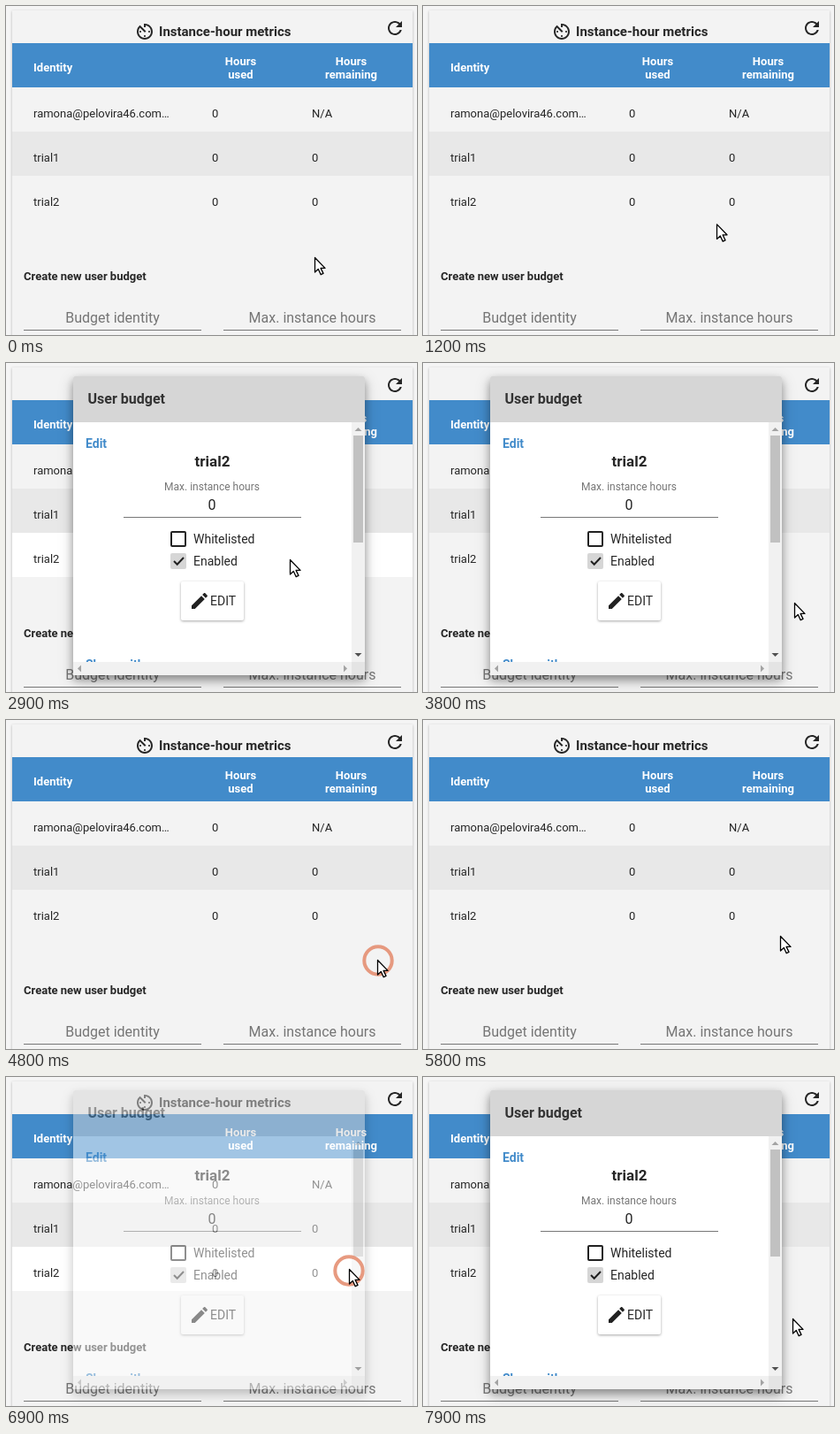
These frames come from a looping animation (465x372 px, 8000 ms). An HTML page:

```html
<!DOCTYPE html>
<html lang="en">
<head>
<meta charset="utf-8">
<title>Instance-hour metrics</title>
<style>
  html, body { margin: 0; width: 100%; height: 100%; overflow: hidden; background: #f5f5f5; }
  svg { display: block; width: 465px; height: 372px; }
  text { font: 13px Roboto, sans-serif; fill: #262626; }
  .b { font-weight: 700; }
  .mid { text-anchor: middle; }
  .head text { fill: #fff; font-weight: 700; }
  .s14 { font-size: 14px; }
  .s16 { font-size: 16px; }
  .hint { fill: #757575; }
  .link { font-size: 14px; font-weight: 700; fill: #428bca; }
  .rule { stroke: #777; stroke-width: 1; }
  #card { filter: drop-shadow(0 1px 1.5px rgba(0,0,0,.28)); }
  #panel { filter: drop-shadow(0 5px 5px rgba(0,0,0,.3)) drop-shadow(0 5px 8px rgba(0,0,0,.2)); }
  #button { filter: drop-shadow(0 1.5px 1.5px rgba(0,0,0,.35)); }
</style>
</head>
<body>
<svg viewBox="0 0 465 372" xmlns="http://www.w3.org/2000/svg">
  <defs><clipPath id="view"><rect x="76" y="67" width="315" height="271"/></clipPath></defs>

  <rect width="465" height="372" fill="#f5f5f5"/>
  <rect id="card" x="7" y="5" width="453" height="400" fill="#f3f3f3"/>
  <path transform="translate(145 17)" fill="#262626" d="M11 17c0 .55.45 1 1 1s1-.45 1-1-.45-1-1-1-1 .45-1 1zm0-14v4h2V5.08c3.39.49 6 3.39 6 6.92 0 3.87-3.13 7-7 7s-7-3.13-7-7c0-1.68.59-3.22 1.58-4.42L12 13l1.41-1.41-6.8-6.8v.02C4.42 6.45 3 9.05 3 12c0 4.97 4.02 9 9 9 4.97 0 9-4.03 9-9s-4.03-9-9-9h-1zm7 9c0-.55-.45-1-1-1s-1 .45-1 1 .45 1 1 1 1-.45 1-1zM6 12c0 .55.45 1 1 1s1-.45 1-1-.45-1-1-1-1 .45-1 1z"/>
  <text class="b" x="173" y="34" style="font-size:15px">Instance-hour metrics</text>
  <path transform="translate(428 13)" fill="#262626" d="M17.65 6.35C16.2 4.9 14.21 4 12 4c-4.42 0-7.99 3.58-7.99 8s3.57 8 7.99 8c3.73 0 6.84-2.55 7.73-6h-2.08c-.82 2.33-3.04 4-5.65 4-3.31 0-6-2.69-6-6s2.69-6 6-6c1.66 0 3.14.69 4.22 1.78L13 11h7V4l-2.35 2.35z"/>

  <g class="head">
    <rect x="7" y="42" width="453" height="50" fill="#428bca"/>
    <text x="31" y="74">Identity</text>
    <text class="mid" x="265.5" y="67">Hours</text>
    <text class="mid" x="265.5" y="82">used</text>
    <text class="mid" x="390.5" y="67">Hours</text>
    <text class="mid" x="390.5" y="82">remaining</text>
  </g>
  <rect x="7" y="142" width="453" height="50" fill="#e8e8e8"/>
  <rect id="hover" x="7" y="192" width="453" height="50" fill="#fff"/>
  <g id="rows"></g>

  <text class="b" x="20" y="310">Create new user budget</text>
  <text class="s16 hint mid" x="120.5" y="358">Budget identity</text>
  <text class="s16 hint mid" x="346.5" y="358">Max. instance hours</text>
  <path class="rule" d="M20 366.5H221M246 366.5H447"/>

  <g id="modal">
    <rect id="panel" x="76" y="15" width="330" height="338" rx="2" fill="#fff"/>
    <path d="M76 67V17a2 2 0 0 1 2-2H404a2 2 0 0 1 2 2V67Z" fill="#d6d6d6"/>
    <text class="b s16" x="92.5" y="46" style="fill:#333">User budget</text>

    <g clip-path="url(#view)">
      <text class="link" x="90" y="96">Edit</text>
      <text class="b mid" x="233.5" y="117" style="font-size:17px">trial2</text>
      <text class="hint mid" x="233" y="144" style="font-size:12px">Max. instance hours</text>
      <text class="s16 mid" x="233" y="166">0</text>
      <path class="rule" d="M133 174.5H334"/>
      <rect x="187" y="191" width="16" height="16" rx="1" fill="none" stroke="#222" stroke-width="2"/>
      <text class="s14" x="212" y="204">Whitelisted</text>
      <rect x="186" y="215" width="18" height="18" rx="2" fill="#d6d6d6"/>
      <path d="M190 224l3.7 3.7L201 220" fill="none" stroke="#222" stroke-width="2"/>
      <text class="s14" x="212" y="229">Enabled</text>
      <rect id="button" x="198" y="247" width="71" height="44" rx="2" fill="#fff"/>
      <path transform="translate(207 257)" fill="#222" d="M3 17.25V21h3.75L17.81 9.94l-3.75-3.75L3 17.25zM20.71 7.04c.39-.39.39-1.02 0-1.41l-2.34-2.34c-.39-.39-1.02-.39-1.41 0l-1.83 1.83 3.75 3.75 1.83-1.83z"/>
      <text class="s14" x="231" y="274">EDIT</text>
      <text class="link" x="90" y="346">Share with</text>
    </g>

    <path d="M391 67H406V353H76V338H391Z" fill="#f1f1f1"/>
    <rect x="391" y="338" width="15" height="15" fill="#e4e4e4"/>
    <rect x="393" y="82" width="11" height="121" fill="#c1c1c1"/>
    <path d="M394.5 77h8l-4-4ZM85 341.500v8l-4-4ZM382 341.500v8l4-4Z" fill="#a3a3a3"/>
    <path d="M394.500 328h8l-4 4Z" fill="#505050"/>
  </g>

  <circle id="ring" r="15.7" fill="none" stroke="#e6957a" stroke-width="4"/>
  <g id="pointer" stroke="#000" stroke-width="1.3" stroke-linejoin="round" fill="#fff">
    <path id="arrow" d="M.5.5V17l3.800-3.500 2.900 6.200 2.800-1.300-2.900-6H12Z"/>
    <path id="hand" d="M-1.600 1.600a1.600 1.600 0 0 1 3.200 0V6.500l2.600.4 2.600.6 2.400.8a2 2 0 0 1 1.300 2L10 13 8.800 16.200H.5L-1 13.500-4.200 9.600a1.300 1.300 0 0 1 1.800-1.900L-1.600 8.800ZM1.600 6.500V9.500M4.200 7V9.700M6.800 7.600V10"/>
  </g>
</svg>
<script>
const LOOP = 8000, STEP = 100;
const $ = id => document.getElementById(id);
const clamp = v => Math.min(1, Math.max(0, v));
const ease = p => p * p * (3 - 2 * p);
const ramp = (t, start, steps) => clamp((t - start + STEP) / (steps * STEP));

const rows = [
  ['ramona@pelovira46.com…', '0', 'N/A'],
  ['trial1', '0', '0'],
  ['trial2', '0', '0']
];
const columns = [31, 233, 346];
$('rows').innerHTML = rows.map((row, r) => row.map((cell, c) =>
  `<text x="${columns[c]}" y="${126 + r * 50}">${cell}</text>`).join('')).join('');

const home = [349, 284];
const moves = [
  { at: 900, steps: 7, to: [321, 222] },
  { at: 3200, steps: 7, to: [420, 271] },
  { at: 5600, steps: 6, to: [388, 217] },
  { at: 7700, steps: 3, to: [418, 273] }
];
const clicks = [
  { at: 2400, x: 322, y: 224 },
  { at: 4700, x: 421, y: 272 },
  { at: 6800, x: 388, y: 219 }
];

function pointerAt(t) {
  let [x, y] = home;
  for (const { at, steps, to } of moves) {
    const p = ease(ramp(t, at, steps));
    x += (to[0] - x) * p;
    y += (to[1] - y) * p;
  }
  return [x, y];
}

function ringAlpha(age) {
  if (age < 0 || age >= 500) return 0;
  if (age < 100) return 0.7;
  return age < 400 ? 0.95 : 0.5;
}

function draw(time) {
  const t = Math.floor(time % LOOP / STEP) * STEP;

  const [x, y] = pointerAt(t);
  const isHand = t >= 5600 && t < 6900 && y < 242;
  $('pointer').setAttribute('transform', `translate(${x} ${y})`);
  $('hand').style.display = isHand ? '' : 'none';
  $('arrow').style.display = isHand ? 'none' : '';

  $('hover').setAttribute('opacity',
    ramp(t, 1300, 3) - ramp(t, 3200, 3) + ramp(t, 5900, 3) - ramp(t, 7700, 3));

  const opened = t < 4800 ? ramp(t, 2500, 2) : ramp(t, 6900, 2);
  $('modal').style.display = opened ? '' : 'none';
  $('modal').setAttribute('opacity', opened);

  const click = clicks.find(c => t >= c.at && t < c.at + 500);
  $('ring').setAttribute('opacity', click ? ringAlpha(t - click.at) : 0);
  if (click) $('ring').setAttribute('transform', `translate(${click.x} ${click.y})`);
}

const start = performance.now();
function tick() {
  draw(performance.now() - start);
  requestAnimationFrame(tick);
}
tick();
</script>
</body>
</html>
```
